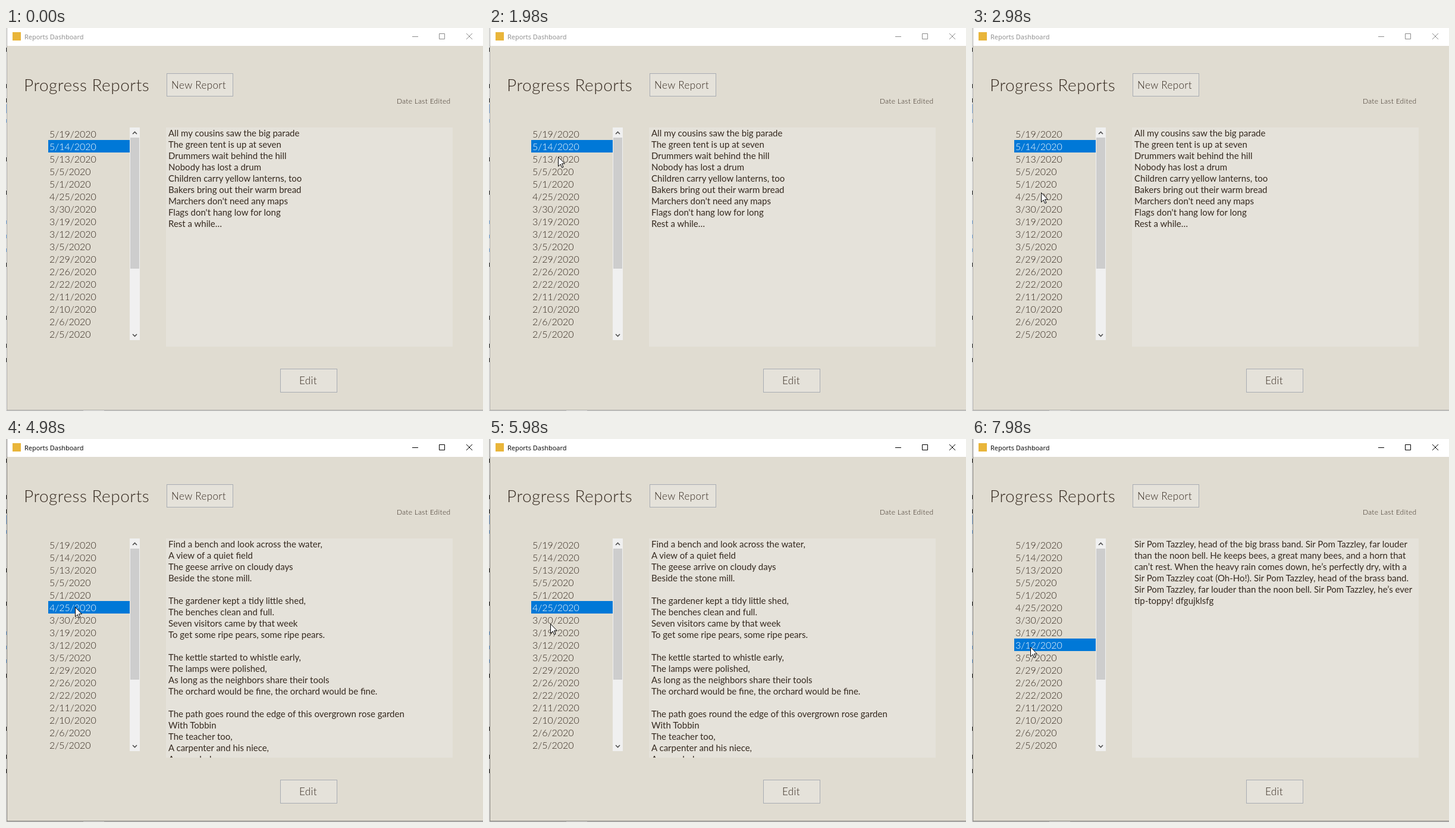
Recreate the animation shown at these times as an HTML page. Size 802 px wide and 643 px high, loop 8 s.

```html
<!DOCTYPE html>
<html lang="en">
<head>
<meta charset="utf-8">
<title>Reports Dashboard</title>
<style>
html, body { margin: 0; width: 802px; height: 643px; overflow: hidden; background: #e0dcd1; }
svg { display: block; }
text { font-family: Lato, sans-serif; font-weight: 300; fill: #35291f; white-space: pre; }
.title { font: 11px "Open Sans", sans-serif; }
.heading { font-size: 28px; letter-spacing: .5px; }
.button { font-size: 17px; letter-spacing: .4px; }
.label { font-size: 12px; letter-spacing: .3px; }
.date { font-size: 16px; }
.body { font-size: 15px; font-weight: 400; }
</style>
</head>
<body>
<svg id="stage" width="802" height="643" viewBox="0 0 802 643"></svg>
<script>
const LOOP = 8000;
const dates = ["5/19", "5/14", "5/13", "5/5", "5/1", "4/25", "3/30", "3/19", "3/12",
  "3/5", "2/29", "2/26", "2/22", "2/11", "2/10", "2/6", "2/5"];

const reports = {
  1: `All my cousins saw the big parade
The green tent is up at seven
Drummers wait behind the hill
Nobody has lost a drum
Children carry yellow lanterns, too
Bakers bring out their warm bread
Marchers don't need any maps
Flags don't hang low for long
Rest a while…`,
  5: `Find a bench and look across the water,
A view of a quiet field
The geese arrive on cloudy days
Beside the stone mill.

The gardener kept a tidy little shed,
The benches clean and full.
Seven visitors came by that week
To get some ripe pears, some ripe pears.

The kettle started to whistle early,
The lamps were polished,
As long as the neighbors share their tools
The orchard would be fine, the orchard would be fine.

The path goes round the edge of this overgrown rose garden
With Tobbin
The teacher too,
A carpenter and his niece,
A new clerk,`,
  8: `Sir Pom Tazzley, head of the big brass band. Sir Pom Tazzley, far louder
than the noon bell. He keeps bees, a great many bees, and a horn that
can’t rest. When the heavy rain comes down, he’s perfectly dry, with a
Sir Pom Tazzley coat (Oh-Ho!). Sir Pom Tazzley, head of the brass band.
Sir Pom Tazzley, far louder than the noon bell. Sir Pom Tazzley, he’s ever
tip-toppy! dfgujklsfg`
};

// [start time, x, y] of the pointer; it jumps between the places
const pointer = [[1000, 589, 568], [1980, 116, 216], [2980, 116, 276],
  [3980, 116, 282], [5980, 103, 310], [6980, 98, 349]];
// [start time, selected row]
const selection = [[0, 1], [4980, 5], [7980, 8]];

const rect = (x, y, w, h, fill, more = "") =>
  `<rect x="${x}" y="${y}" width="${w}" height="${h}" fill="${fill}" ${more}/>`;
const text = (x, y, cls, str, more = "") =>
  `<text x="${x}" y="${y}" class="${cls}" ${more}>${str}</text>`;
const path = (d, stroke, width = 1, fill = "none") =>
  `<path d="${d}" stroke="${stroke}" stroke-width="${width}" fill="${fill}"/>`;
const button = (x, y, w, h, tx, ty, str) =>
  rect(x + .5, y + .5, w - 1, h - 1, "#e5e2da", 'stroke="#a8acb3"') + text(tx, ty, "button", str);

// sliver of the window behind, along the left edge
function backdrop() {
  const dark = [33, 94, 118, 217, 273, 394, 483, 530, 554];
  const blue = [153, 323, 347, 370];
  return rect(0, 0, 1, 643, "#f4f4f4") + rect(0, 128, 1, 15, "#8fb8e8") +
    dark.map(y => rect(0, y, 1.5, 7, "#333")).join("") +
    blue.map(y => rect(0, y, 1.5, 6, "#7fb2ea")).join("");
}

function windowFrame(active) {
  const ink = active ? "#000" : "#8c8c8c";
  const edge = active ? "#77756f" : "#aaa9a5";
  return rect(1, 0, 801, 30, "#fff") +
    rect(1, 0, 1, 642, edge) + rect(1, 641, 801, 1, edge) +
    rect(0, 642, 802, 1, "#c8c8c8") + rect(130, 642, 35, 1, "#eee") +
    rect(11, 7, 14, 14, "#e9b53a") +
    text(31, 19, "title", "Reports Dashboard", `style="fill:${ink}"`) +
    path("M683 14.5h10M728.5 9.5h9v9h-9zM774 9l10 10M784 9l-10 10", ink);
}

function list(row) {
  return rect(71, 167 + 21 * row, 137, 21, "#0078d7") +
    dates.map((d, i) => text(73, 184 + 21 * i, "date", d + "/2020",
      i === row ? 'style="fill:#fff"' : "")).join("") +
    rect(208, 167, 17, 357, "#f0f0f0") + rect(209, 184, 15, 220, "#cdcdcd") +
    path("M213 178l3.5 -3.5l3.5 3.5M213 514l3.5 3.5l3.5 -3.5", "#505050", 1.6);
}

function report(row) {
  const lines = reports[row].split("\n");
  return rect(269, 167, 482, 368, "#e5e2da") + '<g clip-path="url(#page)">' +
    lines.map((s, i) => text(273, 182 + 19 * i, "body", s)).join("") + "</g>";
}

function cursor([, x, y]) {
  return `<g transform="translate(${x} ${y})">` +
    path("M.5 .5V16.3L4.2 12.8L6.7 18.4L9 17.4L6.5 11.8H11.4Z", "#000", 1, "#fff") + "</g>";
}

const stage = document.getElementById("stage");
const current = (steps, t) => steps.filter(s => s[0] <= t).pop();
let shown;

function draw(t) {
  const [start, row] = current(selection, t);
  const place = current(pointer, t);
  const key = row + ":" + place;
  if (key === shown) return;
  shown = key;
  stage.innerHTML =
    '<clipPath id="page"><rect x="269" y="167" width="482" height="368"/></clipPath>' +
    rect(0, 0, 802, 643, "#e0dcd1") + backdrop() + windowFrame(start > 0) +
    text(30, 106, "heading", "Progress Reports") +
    button(270, 76, 112, 39, 278, 102, "New Report") +
    text(657, 127, "label", "Date Last Edited") +
    list(row) + report(row) +
    button(461, 572, 96, 40, 493, 598, "Edit") +
    (place ? cursor(place) : "");
}

const begin = performance.now();
function tick() {
  draw((performance.now() - begin) % LOOP);
  requestAnimationFrame(tick);
}
draw(0);
requestAnimationFrame(tick);
</script>
</body>
</html>
```
